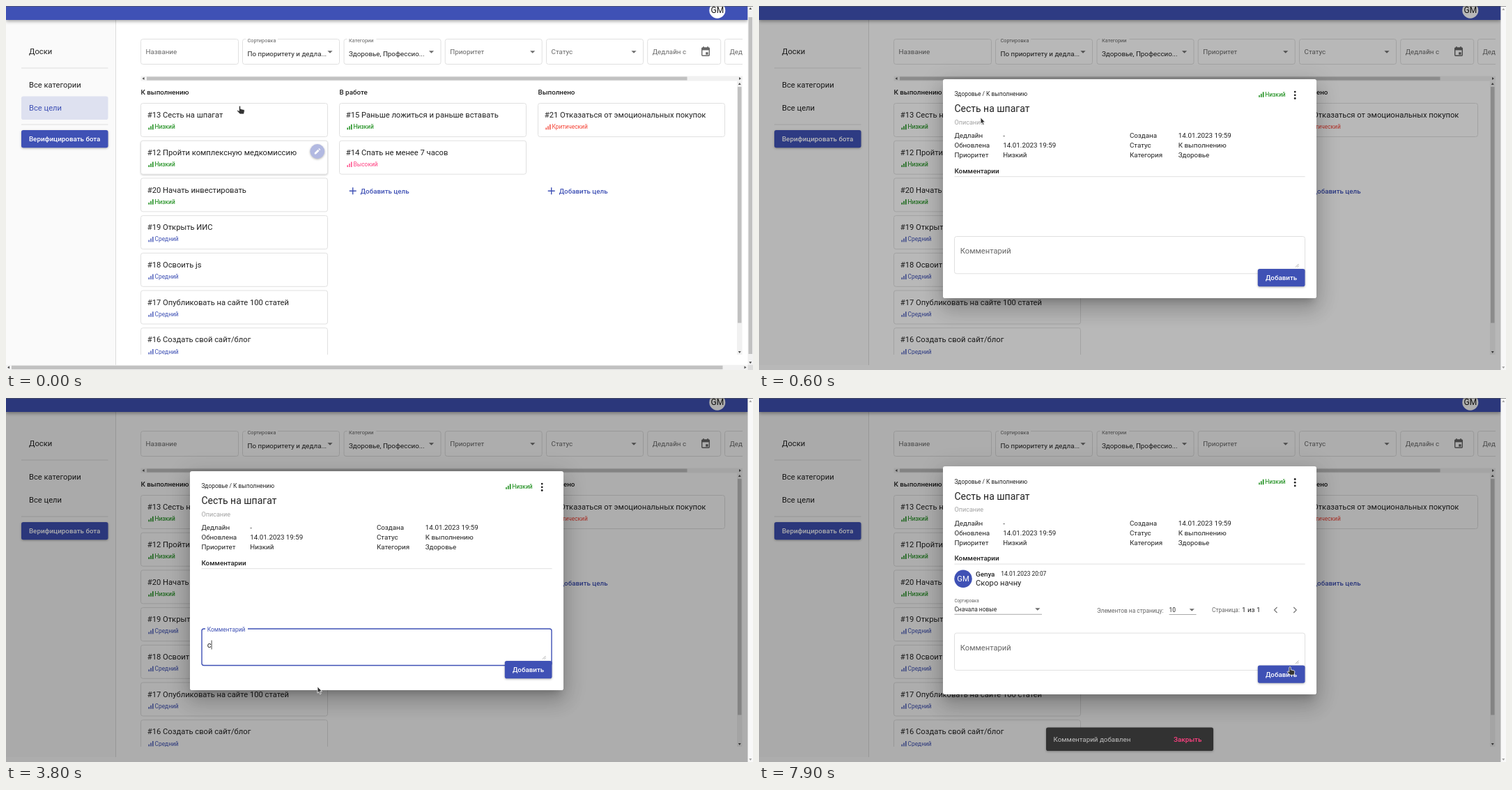
Recreate the animation shown at these times as an HTML page. Size 1072 by 522 pixels, loop 8000 ms.

```html
<!DOCTYPE html>
<html lang="ru">
<head>
<meta charset="utf-8">
<title>Доска целей</title>
<style>
  html, body { margin: 0; width: 100%; height: 100%; overflow: hidden; background: #fff; }
  #stage { position: relative; width: 1072px; height: 522px; overflow: hidden; }
  #stage > *, #dialog > svg { position: absolute; left: 0; top: 0; width: 1072px; height: 522px; }
  svg { display: block; overflow: visible; font-family: Roboto, sans-serif; }
  text { white-space: pre; }
  #stage > #backdrop { width: 1064.5px; background: #000; }
  #dialog { transform-origin: 532px 261.5px; }
  #box {
    position: absolute; left: 264px; width: 536px; background: #fff; border-radius: 2.8px;
    box-shadow: 0 7.7px 10.5px -4.9px rgba(0,0,0,.2), 0 16.8px 26.6px 2.1px rgba(0,0,0,.14),
      0 6.3px 32.2px 5.6px rgba(0,0,0,.12);
  }
  .raised { filter: drop-shadow(0 1.5px 1.5px rgba(0,0,0,.3)); }
  #snack { transform-origin: 532px 489px; }
</style>
</head>
<body>
<div id="stage">
  <svg id="page"></svg>
  <div id="backdrop"></div>
  <svg id="edge"></svg>
  <div id="dialog"><div id="box"></div><svg id="form"></svg></div>
  <svg id="top"></svg>
</div>
<script>
const $ = id => document.getElementById(id);
const BLUE = '#3f51b5', DARK = '#212121', GREY = '#666', LINE = '#e0e0e0';
const LEVELS = {
  'Низкий': '#008000', 'Средний': BLUE, 'Высокий': '#ff4081', 'Критический': '#f44336'
};

const text = (x, y, size, str, fill = DARK, weight = 400, extra = '') =>
  `<text x="${x}" y="${y}" font-size="${size}" fill="${fill}" font-weight="${weight}" ${extra}>${str}</text>`;
const rect = (x, y, w, h, fill, r = 0, extra = '') =>
  `<rect x="${x}" y="${y}" width="${w}" height="${h}" fill="${fill}" rx="${r}" ${extra}/>`;
const frame = (x, y, w, h, extra = '') => rect(x, y, w, h, '#fff', 3, `stroke="${LINE}" ${extra}`);
const path = (d, fill, extra = '') => `<path d="${d}" fill="${fill}" ${extra}/>`;
const group = (id, body, extra = '') => `<g id="${id}" ${extra}>${body}</g>`;
const circle = (x, y, r, fill, extra = '') => `<circle cx="${x}" cy="${y}" r="${r}" fill="${fill}" ${extra}/>`;
const caretDown = (x, y) => path(`M${x - 3.6} ${y - 1.8}h7.2l-3.6 3.6z`, '#6d6d6d');
const arrow = (x, y, dx, dy, fill = '#505050') =>
  path(`M${x + dx * 2} ${y + dy * 2}L${x - dx - dy * 2} ${y - dy - dx * 2}L${x - dx + dy * 2} ${y - dy + dx * 2}z`, fill);

const level = (x, y, name) => [2.8, 5, 7.5]
  .map((h, i) => rect(x + i * 2.8, y + 1 - h, 1.4, h, LEVELS[name])).join('') +
  text(x + 9, y, 8.4, name, LEVELS[name]);

const pencil = (id, x, y) => group(id, circle(x, y, 10.4, '#b2b9e1', 'class="raised"') +
  path(`M${x - 4} ${y + 4}v-2l4.8-4.8 2 2L${x - 2} ${y + 4}zM${x + 1.5} ${y - 3.5}l1-1 2 2-1 1z`, '#fff'));

const card = (x, row, title, name) => {
  const y = 139.5 + row * 53.7;
  return frame(x, y, 268, 48, 'class="card"') + text(x + 9.3, y + 20.6, 11.2, title) + level(x + 11, y + 36.8, name);
};

const column = (x, title, cards) => text(x, 127.2, 9.8, title, DARK, 500) +
  cards.map(([t, l], i) => card(x, i, t, l)).join('');

const addGoal = x => path(`M${x} 265.2h10m-5-5v10`, 'none', `stroke="${BLUE}" stroke-width="1.4"`) +
  text(x + 16, 268.8, 9.8, 'Добавить цель', BLUE, 500);

// Outlined field, with a floating label when it holds a value
const field = (x, w, label, value, select) => frame(x, 47.5, w, 36) +
  (value
    ? rect(x + 4.5, 46, label.length * 4.1 + 5, 3, '#fff') +
      text(x + 7, 51.6, 7.35, label, GREY) + text(x + 7, 71.8, 9.8, value)
    : text(x + 7, 69.4, 9.8, label, GREY)) +
  (select ? caretDown(x + w - 13.5, 66) : '');

const calendar = rect(998.7, 60, 10.6, 11.3, 'none', 1, 'stroke="#666" stroke-width="1.4"') +
  rect(998.7, 60, 10.6, 3.4, '#666') + rect(1000.3, 58, 1.4, 3, '#666') +
  rect(1006.3, 58, 1.4, 3, '#666') + rect(1004.2, 66.3, 3.4, 3.4, '#666');

const hScroll = (x, y, w, h, from, to) => rect(x, y, w, h, '#f1f1f1') +
  rect(from, y + 1, to - from, h - 2, '#c1c1c1') +
  arrow(x + 4, y + h / 2, -1, 0) + arrow(x + w - 4, y + h / 2, 1, 0);
const vScroll = (x, y, w, h, from, to) => rect(x, y, w, h, '#f1f1f1') +
  rect(x + 1, from, w - 2, to - from, '#c1c1c1') +
  arrow(x + w / 2, y + 4, 0, -1) + arrow(x + w / 2, y + h - 4, 0, 1);

$('page').innerHTML = `<clipPath id="board"><rect x="190" y="30" width="867" height="470"/></clipPath>` +
  rect(0, 0, 1072, 522, '#fff') + rect(0, 0, 157, 515, '#fafafa') + rect(157, 0, 1, 515, '#dcdcdc') +
  text(33, 69, 11.2, 'Доски') + rect(22, 88.5, 124.5, 1, LINE) +
  text(33, 117, 11.2, 'Все категории') +
  rect(22, 129.5, 124.5, 33.5, '#dee1f0', 2.8, 'id="active"') +
  text(33, 150.4, 11.2, 'Все цели', BLUE, 400, 'id="goals"') + rect(22, 169.5, 124.5, 1, LINE) +
  rect(22, 178, 124.5, 25.3, BLUE, 2.8, 'class="raised"') +
  text(84.2, 193.9, 9.8, 'Верифицировать бота', '#fff', 500, 'text-anchor="middle"') +
  group('lists',
    field(193.5, 140, 'Название') +
    field(339.5, 139, 'Сортировка', 'По приоритету и дедла...', true) +
    field(485, 139, 'Категории', 'Здоровье, Профессио...', true) +
    field(630.2, 139, 'Приоритет', '', true) +
    field(775.5, 139, 'Статус', '', true) +
    field(920.7, 105, 'Дедлайн с') + calendar + field(1031.5, 105, 'Дедлайн по') +
    column(193.5, 'К выполнению', [
      ['#13 Сесть на шпагат', 'Низкий'],
      ['#12 Пройти комплексную медкомиссию', 'Низкий'],
      ['#20 Начать инвестировать', 'Низкий'],
      ['#19 Открыть ИИС', 'Средний'],
      ['#18 Освоить js', 'Средний'],
      ['#17 Опубликовать на сайте 100 статей', 'Средний'],
      ['#16 Создать свой сайт/блог', 'Средний']]) +
    column(478.5, 'В работе', [
      ['#15 Раньше ложиться и раньше вставать', 'Низкий'],
      ['#14 Спать не менее 7 часов', 'Высокий']]) +
    column(763.5, 'Выполнено', [['#21 Отказаться от эмоциональных покупок', 'Критический']]) +
    addGoal(492.7) + addGoal(777.7) +
    pencil('edit13', 446.8, 154.8) + pencil('edit12', 446.8, 208.5), 'clip-path="url(#board)"') +
  hScroll(193.5, 100.5, 863.5, 7, 202, 977.5) + vScroll(1049, 108, 7.5, 392, 116, 454.5) +
  rect(0, 0, 1064.5, 20, BLUE, 0, 'style="filter:drop-shadow(0 2px 2.5px rgba(0,0,0,.35))"') +
  circle(1020.8, 6.2, 11.5, '#fff') + text(1020.8, 10.4, 12, 'GM', '#111', 400, 'text-anchor="middle"');

$('edge').innerHTML =
  group('bars', vScroll(1064.5, 0, 7.5, 515, 16, 499) + hScroll(0, 514.7, 1064.5, 7.3, 8, 1028.5) +
    rect(1064.5, 514.7, 8, 8, '#dcdcdc')) +
  group('blocked', rect(1064.5, 0, 7.5, 522, '#f8f8f8') +
    arrow(1068.3, 5, 0, -1, '#a3a3a3') + arrow(1068.3, 518, 0, 1, '#a3a3a3')) +
  rect(0, 0, 1072, 1, '#555', 0, 'opacity=".6"');

const pairs = (x, dx, rows) => rows.map(([k, v], i) =>
  text(x, 189.4 + i * 14, 9.8, k) + text(x + dx, 189.4 + i * 14, 9.8, v)).join('');
const chevron = (x, d) => path(`M${x - d * 2} 300l${d * 4} 4l${-d * 4} 4`, 'none', 'stroke="#777" stroke-width="1.2"');

$('form').innerHTML =
  group('head',
    text(280.4, 129.3, 8.4, 'Здоровье / К выполнению') + level(717.3, 129.8, 'Низкий') +
    [-4.7, 0, 4.7].map(d => circle(769.2, 127.8 + d, 1.4, DARK)).join('') +
    text(280.4, 152.4, 14, 'Сесть на шпагат') + text(280.4, 170, 9.1, 'Описание', '#a3a3a3') +
    pairs(280.4, 69.8, [['Дедлайн', '-'], ['Обновлена', '14.01.2023 19:59'], ['Приоритет', 'Низкий']]) +
    pairs(531.9, 69.9, [['Создана', '14.01.2023 19:59'], ['Статус', 'К выполнению'], ['Категория', 'Здоровье']]) +
    text(280.4, 239.8, 9.8, 'Комментарии', DARK, 500) + rect(280.4, 244.2, 503.2, 1, LINE)) +
  group('comment',
    circle(293, 259.2, 12.7, BLUE) + text(293, 263.2, 11.2, 'GM', '#fff', 400, 'text-anchor="middle"') +
    text(311, 255.7, 9.8, 'Genya', DARK, 500) + text(347.3, 255.2, 8.4, '14.01.2023 20:07') +
    text(311, 269, 11.2, 'Скоро начну') +
    text(280.4, 293.3, 6.3, 'Сортировка', GREY) + text(280.4, 305.6, 8.4, 'Сначала новые') +
    caretDown(399.8, 303) + rect(280.4, 309.8, 125.6, .8, '#949494') +
    text(485, 308.2, 8.4, 'Элементов на страницу:', GREY) + text(588.5, 306.6, 8.4, '10') +
    caretDown(621.2, 304) + rect(588.5, 310.2, 39, .8, '#949494') +
    text(650, 306.8, 8.4, 'Страница:', GREY) + text(693, 307.2, 9.8, '1 из 1') +
    chevron(741.5, -1) + chevron(769.2, 1)) +
  group('foot',
    group('idle', frame(280.5, 330.5, 503, 53.3) + text(288.8, 355.2, 11.2, 'Комментарий', GREY)) +
    group('focused', rect(281, 331, 502, 52.5, '#fff', 3, `stroke="${BLUE}" stroke-width="1.4"`) +
      rect(286, 329.5, 61, 3, '#fff') + text(288.8, 335, 8.4, 'Комментарий', BLUE) +
      text(288.8, 358, 11.2, 'Напишите комментарий о ходе достижения цели', '#9e9e9e', 400, 'id="hint"') +
      text(288.8, 358, 11.2, '', DARK, 400, 'id="value"') + rect(0, 0, .8, 13, '#222', 0, 'id="caret"')) +
    path('M770 374.5l4.500-4.500m-2 4.500l2-2', 'none', 'stroke="#888" stroke-width=".7"') +
    rect(715.8, 377, 67.7, 25.2, BLUE, 2.8, 'class="raised"') +
    text(749.6, 393, 9.8, 'Добавить', '#fff', 500, 'text-anchor="middle"'));

const OUTLINE = 'stroke="#fff" stroke-width=".8" stroke-linejoin="round"';
$('top').innerHTML =
  group('snack', rect(412, 472.5, 240, 33.5, '#323232', 2.8, 'class="raised"') +
    text(422.6, 492.8, 9.8, 'Комментарий добавлен', '#c2c2c2') + text(595, 492.8, 9.8, 'Закрыть', '#ff4081', 500)) +
  group('cursor',
    path('M0 0v9.400l2.100-1.900 1.500 3.400 1.600-.7-1.500-3.300h2.800z', '#333', `${OUTLINE} id="pointer"`) +
    path('M-1.200 1Q0-.6 1.200 1V4.500l4.600 1.100q1.200.4 1 2L6 12H.2L-4 7.600q.4-1.600 2-.7l.8.600z', '#333', `${OUTLINE} id="hand"`));

// Cursor track: time, x, y
const TRACK = [
  [0, 335.5, 143], [300, 317.5, 155], [500, 317, 155], [600, 318, 159.8], [700, 335, 200], [900, 430, 335],
  [1000, 447, 355], [1200, 447, 413.8], [6400, 447, 413.8], [6600, 690, 350], [6800, 881.3, 285.3],
  [7000, 1017, 231], [7100, 960, 290], [7300, 764, 383], [7400, 762, 385.3], [8000, 762, 385.3]
];
const TYPING = [
  [0, ''], [1600, 'С'], [1800, 'Ск'], [2000, 'Ско'], [2100, 'Ско '], [2800, ''], [3200, 'с'], [3300, 'ск'],
  [3800, 'с'], [4000, ''], [4200, 'С'], [4400, 'Ско'], [4600, 'Скор'], [4700, 'Скоро'], [4800, 'Скоро '],
  [4900, 'Скоро н'], [5100, 'Скоро на'], [5300, 'Скоро нач'], [5600, 'Скоро начн'], [5700, 'Скоро начну'],
  [6000, 'Скоро начну\n']
];
const LOOP = 8000, STEP = 100, OPEN = 445, FOCUS = 1000, SENT = 7600;

function bezier(x1, y1, x2, y2, p) {
  const at = (a, b, s) => 3 * (1 - s) * (1 - s) * s * a + 3 * (1 - s) * s * s * b + s ** 3;
  const x = Math.min(1, Math.max(0, p));
  let lo = 0, hi = 1;
  for (let i = 0; i < 24; i++) {
    const mid = (lo + hi) / 2;
    if (at(x1, x2, mid) < x) lo = mid; else hi = mid;
  }
  return at(y1, y2, lo);
}
const enter = p => bezier(0, 0, .2, 1, p);
const show = (id, on) => { $(id).style.display = on ? '' : 'none'; };
const shift = (id, y) => $(id).setAttribute('transform', `translate(0 ${y})`);

function moveCursor(t) {
  const i = TRACK.findIndex(k => k[0] > t);
  const [t0, x0, y0] = TRACK[i - 1], [t1, x1, y1] = TRACK[i];
  const p = (t - t0) / (t1 - t0);
  $('cursor').setAttribute('transform', `translate(${x0 + (x1 - x0) * p} ${y0 + (y1 - y0) * p})`);
  const hand = t < 600 || t >= 7300;
  show('hand', hand);
  show('pointer', !hand);
}

function type(t) {
  const [since, str] = TYPING.filter(k => k[0] <= t).pop();
  const [line, next] = str.split('\n');
  $('value').textContent = line;
  show('hint', !str);
  const newLine = next !== undefined;
  const end = newLine || !line ? 0 : $('value').getComputedTextLength();
  $('caret').setAttribute('x', 288.8 + end);
  $('caret').setAttribute('y', newLine ? 361 : 347.5);
  // The caret restarts its blink on every edit
  show('caret', Math.floor((t - Math.max(since, 1100)) / 500) % 2 === 0);
}

function render(t) {
  const open = t >= OPEN, sent = t >= SENT, focus = t >= FOCUS && !sent;
  $('active').style.display = t < 400 ? '' : 'none';
  $('goals').setAttribute('fill', t < 400 ? BLUE : DARK);
  show('edit12', t < 100);
  show('edit13', t >= 100);
  document.querySelectorAll('.card').forEach((c, i) => {
    c.style.filter = i === (t < 100 ? 1 : 0) && t < 600 ? 'drop-shadow(0 1px 1.2px rgba(0,0,0,.18))' : '';
  });
  show('bars', !open);
  show('blocked', open);
  $('backdrop').style.opacity = .32 * bezier(.25, .8, .25, 1, (t - OPEN) / 400);

  const p = enter((t - OPEN) / 150);
  show('dialog', open);
  $('dialog').style.opacity = p;
  $('dialog').style.transform = p < .999 ? `scale(${.7 + .3 * p})` : 'none';
  const grow = sent ? 6.6 : 0;
  $('box').style.top = 104.5 - grow + 'px';
  $('box').style.height = 314 + grow * 2 + 'px';
  shift('head', -grow);
  shift('foot', grow);
  show('comment', sent);
  show('idle', !focus);
  show('focused', focus);
  if (focus) type(t);

  const s = enter((t - SENT + 40) / 150);
  show('snack', sent);
  $('snack').style.opacity = s;
  $('snack').style.transform = `scale(${.8 + .2 * s})`;
  moveCursor(t);
}

let last = -1;
const start = performance.now();
function tick() {
  const t = Math.floor((performance.now() - start) % LOOP / STEP) * STEP;
  if (t !== last) render(last = t);
  requestAnimationFrame(tick);
}
tick();
</script>
</body>
</html>
```
